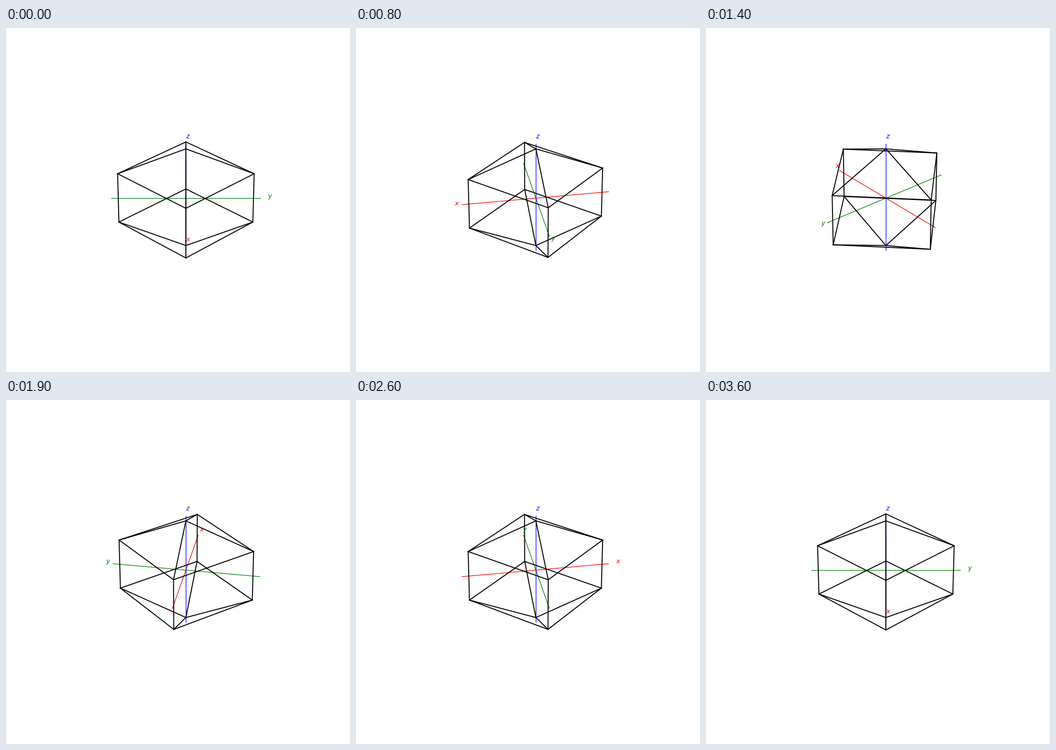
A matplotlib script that plays this animation: 748x748 px, repeating every 3700 ms.

```python
import numpy as np
import matplotlib.pyplot as plt
from matplotlib.animation import FuncAnimation

SIZE, DPI = 748, 100
FRAMES, STEP = 37, 10          # azimuth advances 10 degrees per frame
ELEV = np.radians(30)
DIST = 10                      # camera distance
SIDE = 0.77 * SIZE             # side of the square plot area
SCALE = SIDE / 1.85
CX = 0.5125 * SIZE + SIDE * 0.025 / 1.85
CY = 0.495 * SIZE + SIDE * 0.025 / 1.85

# Solid: two square rings capped by pyramids
BOX = 4 / 7
RADIUS = BOX / 1.21
APEX = 0.75 * BOX / 1.1
HALF = APEX / 2


def ring(z):
    return [(RADIUS, 0, z), (0, RADIUS, z), (-RADIUS, 0, z), (0, -RADIUS, z)]


def build_edges():
    top, bottom = ring(HALF), ring(-HALF)
    edges = []
    for i in range(4):
        j = (i + 1) % 4
        edges += [(top[i], top[j]), (bottom[i], bottom[j]),
                  (top[i], bottom[i]),
                  (top[i], (0, 0, APEX)), (bottom[i], (0, 0, -APEX))]
    return np.array(edges)


def project(points, azim):
    """Perspective view of 3D points, in pixels from the lower left."""
    x, y, z = np.moveaxis(np.asarray(points, float), -1, 0)
    ca, sa = np.cos(azim), np.sin(azim)
    ce, se = np.cos(ELEV), np.sin(ELEV)
    ahead = x * ca + y * sa
    right = y * ca - x * sa
    up = z * ce - ahead * se
    near = z * se + ahead * ce
    k = SCALE / (1 - near / DIST)
    return CX + k * right, CY + k * up


fig = plt.figure(figsize=(SIZE / DPI, SIZE / DPI), dpi=DPI, facecolor="white")
ax = fig.add_axes([0, 0, 1, 1])
ax.set_xlim(0, SIZE)
ax.set_ylim(0, SIZE)
ax.axis("off")

tips = np.diag([RADIUS, RADIUS, APEX])
axis_ends = np.stack([-1.1 * tips, 1.1 * tips], axis=1)
label_pos = 1.21 * tips
edges = build_edges()

colors = ["red", "green", "blue"]
axis_lines = [ax.plot([], [], color=c, lw=1)[0] for c in colors]
edge_lines = [ax.plot([], [], color="black", lw=1.5)[0] for _ in edges]
labels = [ax.text(0, 0, f"${name}$", color=c, fontsize=10)
          for name, c in zip("xyz", colors)]


def update(frame):
    azim = np.radians(frame * STEP)
    for lines, ends in ((axis_lines, axis_ends), (edge_lines, edges)):
        for line, pair in zip(lines, ends):
            line.set_data(*project(pair, azim))
    for label, x, y in zip(labels, *project(label_pos, azim)):
        label.set_position((x, y))
    return axis_lines + edge_lines + labels


anim = FuncAnimation(fig, update, frames=FRAMES, interval=100,
                     repeat=True, repeat_delay=0)
plt.show()
```
